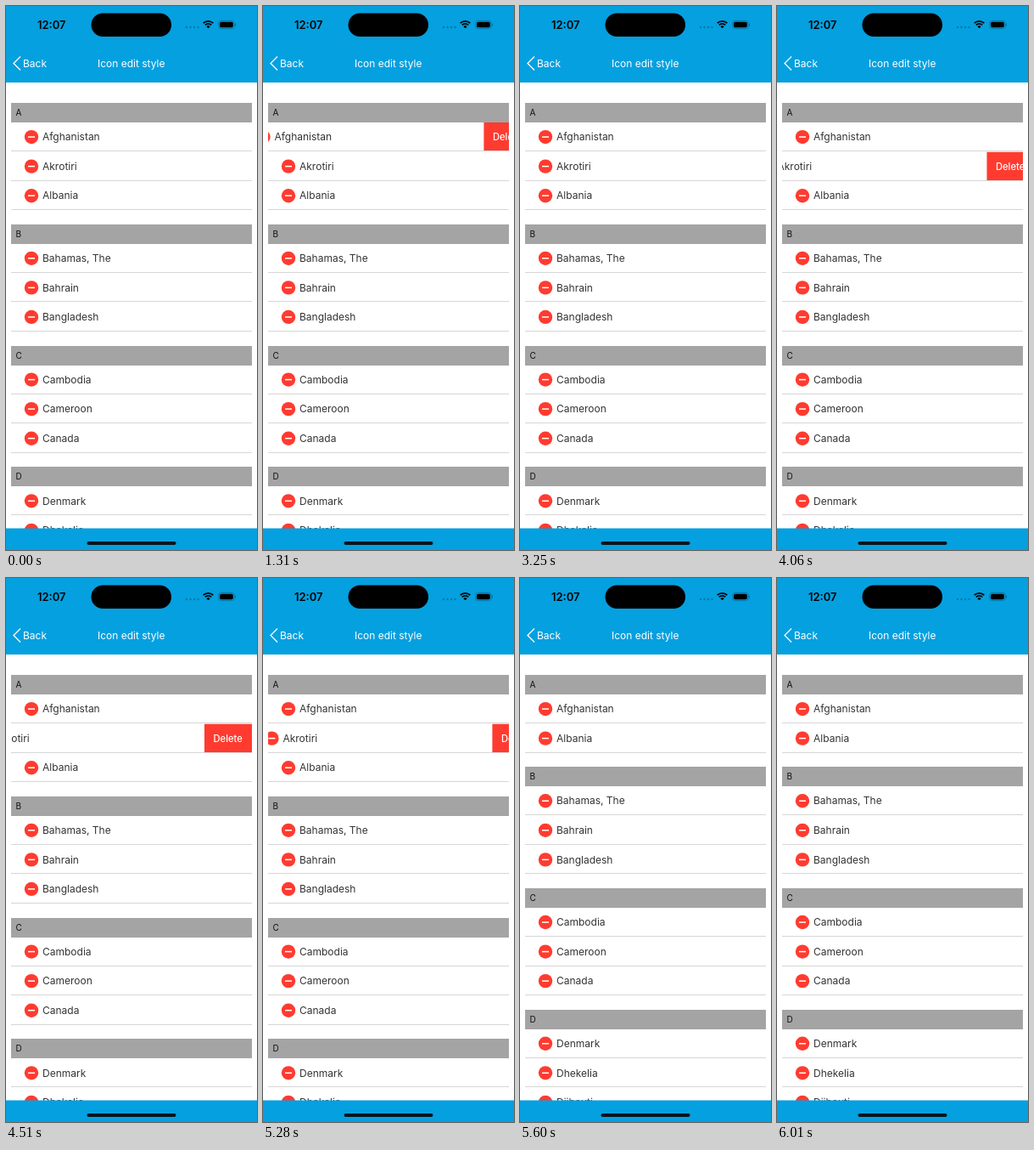
Write an HTML page with a canvas that moves like this. It is 296 px wide and 640 px high and loops after 6.33 s.

```html
<!DOCTYPE html>
<html lang="en">
<head>
<meta charset="utf-8">
<title>Icon edit style</title>
<style>
html, body { margin: 0; width: 100%; height: 100%; overflow: hidden; background: #fff; }
canvas { display: block; width: 296px; height: 640px; }
</style>
</head>
<body>
<canvas id="stage"></canvas>
<script>
const W = 296, H = 640, LOOP = 6330;
const LEFT = 6, RIGHT = 290, TOP = 114, BAR = 90, FOOT = 614.5;
const HEAD = 23, ROW = 34.55, GAP = 16.1, DRAWER = 56;
const BLUE = '#05a0df', RED = '#ff3b30';

const sections = [
  ['A', 'Afghanistan', 'Akrotiri', 'Albania'],
  ['B', 'Bahamas, The', 'Bahrain', 'Bangladesh'],
  ['C', 'Cambodia', 'Cameroon', 'Canada'],
  ['D', 'Denmark', 'Dhekelia', 'Djibouti']
];

// Moments at which the screen refreshes while something moves
const ticks = [
  0, 1310, 1420, 1530, 1640, 1750, 1870,
  2570, 2690, 2800, 2910, 3020, 3130,
  3860, 3960, 4060, 4160, 4280, 4390,
  5050, 5160, 5280, 5390, 5490, 5600
];

const canvas = document.getElementById('stage');
const ctx = canvas.getContext('2d');
const dpr = window.devicePixelRatio || 1;
canvas.width = W * dpr;
canvas.height = H * dpr;

const clamp = v => Math.max(0, Math.min(1, v));

// The standard "ease" curve: cubic-bezier(.25, .1, .25, 1)
function ease(x) {
  if (x <= 0 || x >= 1) return clamp(x);
  const bez = (a, b, u) => 3 * a * u * (1 - u) ** 2 + 3 * b * u * u * (1 - u) + u ** 3;
  let lo = 0, hi = 1;
  for (let i = 0; i < 24; i++) {
    const mid = (lo + hi) / 2;
    if (bez(.25, .25, mid) < x) lo = mid; else hi = mid;
  }
  return bez(.1, 1, lo);
}

const ramp = (t, start, length) => ease((t - start) / length);

function stateAt(time) {
  const t = ticks.filter(k => k <= time).pop();
  const first = t < 1310 ? 0 : ramp(t, 1150, 520) - ramp(t, 2570, 500);
  const second = ramp(t, 3830, 500) - (t < 5050 ? 0 : ramp(t, 4985, 780));
  return {
    slide: { Afghanistan: first * DRAWER, Akrotiri: second * DRAWER },
    collapse: clamp((t - 5380) / 220)
  };
}

function rect(x, y, w, h, color) {
  ctx.fillStyle = color;
  ctx.fillRect(x, y, w, h);
}

function pill(x, y, w, h, r, color) {
  ctx.fillStyle = color;
  ctx.beginPath();
  ctx.roundRect(x, y, w, h, r);
  ctx.fill();
}

function disc(x, y, r, color) {
  ctx.fillStyle = color;
  ctx.beginPath();
  ctx.arc(x, y, r, 0, 7);
  ctx.fill();
}

function text(str, x, y, size, color, weight = 400) {
  ctx.font = `${weight} ${size}px Inter, "Liberation Sans", sans-serif`;
  ctx.fillStyle = color;
  ctx.fillText(str, x, y);
}

function clipped(x, y, w, h, draw) {
  ctx.save();
  ctx.beginPath();
  ctx.rect(x, y, w, h);
  ctx.clip();
  draw();
  ctx.restore();
}

function drawRow(name, y, height, shift) {
  if (height <= 0) return;
  clipped(LEFT, y, RIGHT - LEFT, height, () => {
    const mid = y + ROW / 2 - .2;
    disc(30 - shift, mid, 8.2, RED);
    rect(26 - shift, mid - .75, 8, 1.5, '#fff');
    text(name, 43 - shift, mid + 4.2, 12, '#333');
    if (shift > 0) {
      rect(RIGHT - shift, y, DRAWER, ROW - .5, RED);
      text('Delete', RIGHT - shift + 10.5, mid + 4, 11.2, '#fff', 500);
    }
    rect(LEFT, Math.floor(y + ROW) - 1, RIGHT - LEFT, 1, '#d6d6d6');
  });
}

function drawList(state) {
  let y = TOP;
  for (const [letter, ...names] of sections) {
    rect(LEFT, Math.round(y), RIGHT - LEFT, HEAD, '#a4a4a4');
    text(letter, 11.5, y + 15, 10, '#111');
    y += HEAD;
    for (const name of names) {
      const height = name === 'Akrotiri' ? ROW * (1 - state.collapse) : ROW;
      drawRow(name, y, height, state.slide[name] || 0);
      y += height;
    }
    y += GAP;
  }
}

function drawStatus() {
  text('12:07', 37, 26.5, 13, '#000', 600);
  pill(100.5, 8.5, 94.5, 27.5, 13.75, '#000');
  for (let i = 0; i < 4; i++) disc(213 + i * 4.5, 25, 1.2, '#0479a8');

  // Wi-Fi fan
  ctx.strokeStyle = '#000';
  ctx.lineWidth = 1.8;
  for (const r of [5.2, 8.2]) {
    ctx.beginPath();
    ctx.arc(238.5, 26, r, -Math.PI * .75, -Math.PI * .25);
    ctx.stroke();
  }
  ctx.fillStyle = '#000';
  ctx.beginPath();
  ctx.moveTo(238.5, 26.3);
  ctx.arc(238.5, 26.3, 3, -Math.PI * .75, -Math.PI * .25);
  ctx.fill();

  // Battery
  ctx.strokeStyle = '#046f9b';
  ctx.lineWidth = .8;
  ctx.beginPath();
  ctx.roundRect(250.6, 17.4, 18.6, 9.2, 2.8);
  ctx.stroke();
  pill(252, 18.8, 15.8, 6.4, 1.7, '#000');
  pill(270, 20.6, 1, 2.9, .5, '#046f9b');
}

function drawBars() {
  rect(0, 0, W, BAR, BLUE);
  rect(0, FOOT, W, H - FOOT, BLUE);
  drawStatus();
  ctx.strokeStyle = '#fff';
  ctx.lineWidth = 1.3;
  ctx.beginPath();
  ctx.moveTo(17, 59.5);
  ctx.lineTo(9, 67.5);
  ctx.lineTo(17, 75.5);
  ctx.stroke();
  text('Back', 20, 71.8, 12, '#fff');
  text('Icon edit style', 108, 71.8, 12, '#fff');
  pill(95.5, 630, 105, 4, 2, '#06141b');
}

function frame(now) {
  ctx.setTransform(dpr, 0, 0, dpr, 0, 0);
  rect(0, 0, W, H, '#fff');
  drawList(stateAt(now % LOOP));
  drawBars();
}

const begin = performance.now();
function loop() {
  frame(performance.now() - begin);
  requestAnimationFrame(loop);
}
loop();
</script>
</body>
</html>
```
